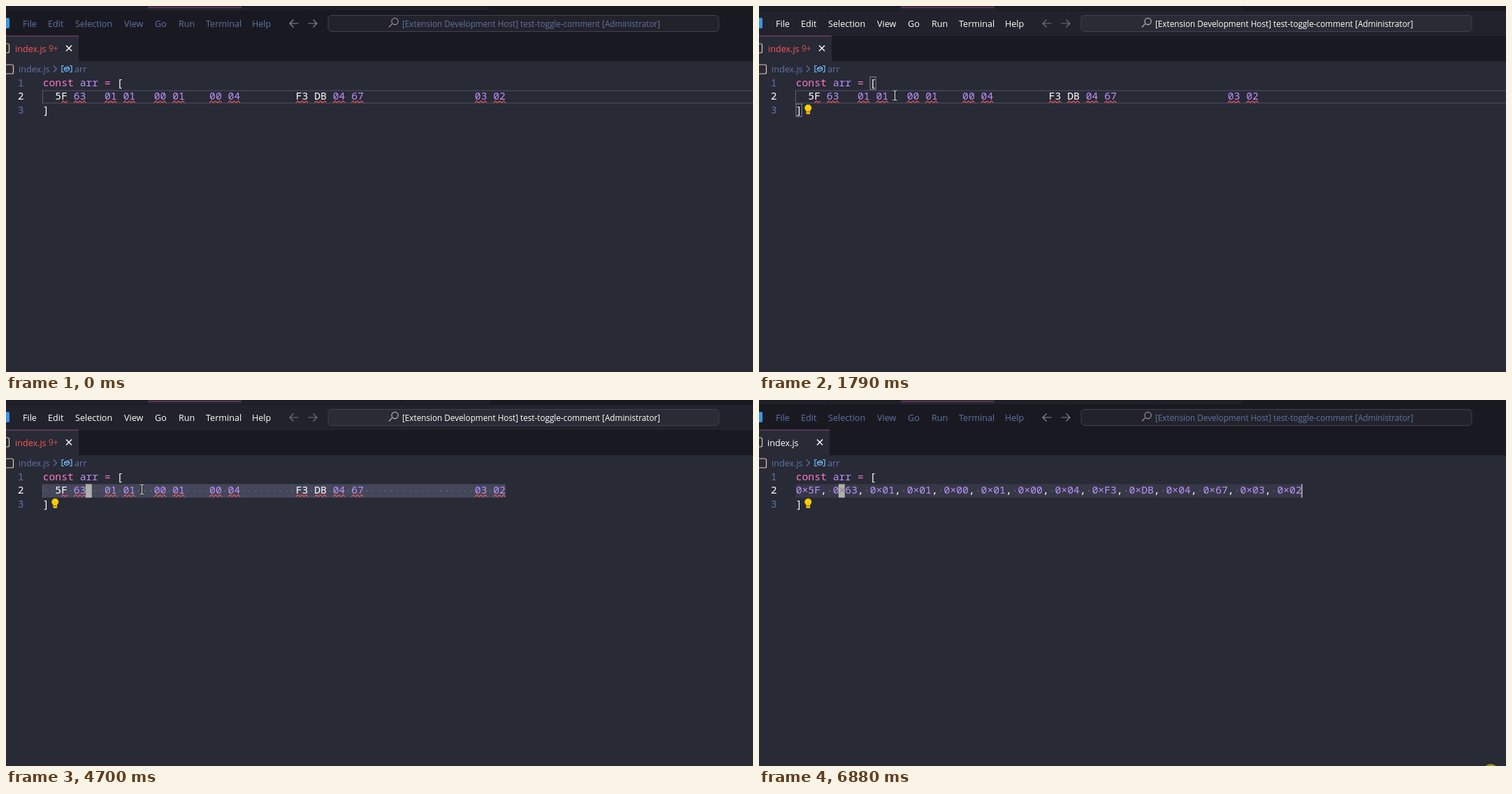
Recreate the animation shown at these times as an HTML page. Size 1069 by 524 pixels, loop 6.91 s.

```html
<!DOCTYPE html>
<html lang="en">
<head>
<meta charset="utf-8">
<title>Hex formatting in an editor</title>
<style>
html, body { margin: 0; width: 100%; height: 100%; overflow: hidden; background: #282a36; }
svg { display: block; width: 1069px; height: 524px; }
text { font: 12.6px "Open Sans", "Noto Sans", sans-serif; white-space: pre; }
.code { font: 500 14.72px "Noto Sans Mono", "DejaVu Sans Mono", monospace; }
.title { font-size: 11.73px; }
.small { font-size: 11.4px; }
.line { fill: none; }
</style>
</head>
<body>
<svg id="stage" viewBox="0 0 1069 524"></svg>
<script>
const LOOP = 6910, CW = 8.83, LEFT = 52.7, TOP = 101, LH = 19.4;
const C = { bg: '#282a36', dark: '#191a21', bar: '#21222c', sel: '#44475a', dim: '#6272a4',
  white: '#ffffff', pink: '#ff79c6', purple: '#bd93f9', red: '#ff5555' };
const stage = document.getElementById('stage');

function add(parent, tag, attrs, text) {
  const el = document.createElementNS('http://www.w3.org/2000/svg', tag);
  for (const k in attrs) el.setAttribute(k, attrs[k]);
  if (text !== undefined) el.textContent = text;
  parent.appendChild(el);
  return el;
}
const set = (el, attrs) => { for (const k in attrs) el.setAttribute(k, attrs[k]); };
const show = (el, on) => el.setAttribute('visibility', on ? 'inherit' : 'hidden');
const group = (p = stage) => add(p, 'g', {});
const box = (p, x, y, width, height, fill, more) => add(p, 'rect', { x, y, width, height, fill, ...more });
const path = (p, d, stroke, width = 1) => add(p, 'path', { d, stroke, 'stroke-width': width, class: 'line' });
const label = (p, x, y, text, fill = C.white, cls = '') => add(p, 'text', { x, y, class: cls, style: 'fill:' + fill }, text);
const colX = c => LEFT + c * CW;
const lineY = n => TOP + (n - 1) * LH;
const code = (p, col, n, text, fill) => label(p, colX(col), lineY(n) + 14, text, fill, 'code');

// window frame
box(stage, 0, 0, 1069, 524, C.bg);
box(stage, 0, 0, 1069, 7, C.dark);
box(stage, 0, 1, 692, 5, '#1f2029');
box(stage, 203, 1, 134, 5, '#252733');
box(stage, 203, 1, 134, 1.5, '#6d3c5f');
for (const x of [99, 437, 564]) box(stage, x, 1, 1, 5, C.dark);
const bar = box(stage, 0, 7, 1069, 36, C.dark);
box(stage, 0, 43, 1069, 36, C.dark);
box(stage, -10, 17, 15, 15, '#3794e8', { rx: 2 });

const barText = [['File', 24], ['Edit', 60], ['Selection', 99], ['View', 169], ['Go', 213],
  ['Run', 247], ['Terminal', 286], ['Help', 352]].map(([s, x]) => label(stage, x, 30, s));
const arrows = [path(stage, 'M418.5 25H406.5M411.5 19.5L406 25L411.5 30.5', '#fff', 1.2),
  path(stage, 'M432.5 25H444.5M439.5 19.5L445 25L439.5 30.5', '#fff', 1.2)];
const search = box(stage, 461, 13.5, 559, 23, C.bar, { rx: 5, stroke: '#40424f' });
const lens = path(stage, 'M552.4 25.6L548 30.5M552 22A4.6 4.6 0 1 1 561.2 22A4.6 4.6 0 1 1 552 22', '#aaa', 1.2);
barText.push(label(stage, 567, 30, '[Extension Development Host] test-toggle-comment [Administrator]', C.white, 'title'));

// file tab and breadcrumb
const tabs = [true, false].map(bad => {
  const g = group(), w = bad ? 104 : 101, x = bad ? 90 : 87;
  box(g, 0, 43, w, 36, C.bg);
  box(g, 0, 42.5, w, 1, '#8a4a78');
  label(g, bad ? 13 : 12, 65.5, 'index.js', bad ? C.red : C.white);
  if (bad) label(g, 61, 65, '9+', '#e05054', 'title');
  path(g, `M${x - 4} 56.5l8 8m0 -8l-8 8`, C.white, 1.4);
  return g;
});
box(stage, -9, 54, 13.5, 13, 'none', { rx: 2, stroke: '#e3c6b0', 'stroke-width': 1.2 });
box(stage, -2, 84, 12.5, 13, 'none', { rx: 2, stroke: '#e3c6b0', 'stroke-width': 1.2 });
label(stage, 18, 95, 'index.js', C.dim);
path(stage, 'M68 85.5L72.5 90L68 94.5', C.dim, 1.1);
path(stage, 'M83 85.5H80V94.5H83M91 85.5H94V94.5H91M83.5 89L88 87L90.5 88.5V91.5L86.5 93.5L83.5 92ZM83.5 89L86.5 90.3L90.5 88.5', '#75beff', 1.2);
label(stage, 98, 95, 'arr', C.dim);

// editor
const activeLine = group();
box(activeLine, LEFT, .2, 1020, 1.4, C.sel);
box(activeLine, LEFT, 17.8, 1020, 1.4, C.sel);
const selection = box(stage, LEFT, lineY(2), 10, LH, C.sel);
const guide = box(stage, 52, lineY(2), 1, LH, '#5b5d68');
const numbers = [1, 2, 3].map(n => label(stage, 16.8, lineY(n) + 14, n, C.dim, 'code'));
code(stage, 0, 1, 'const', C.pink);
code(stage, 6, 1, 'arr', C.purple);
code(stage, 10, 1, '=', C.pink);
code(stage, 12, 1, '[', C.white);
code(stage, 0, 3, ']', C.white);

const bytes = '5F 63 01 01 00 01 00 04 F3 DB 04 67 03 02'.split(' ');
const cols = [2, 5, 10, 13, 18, 21, 27, 30, 41, 44, 47, 50, 70, 73];
const dot = (g, c) => box(g, colX(c) + 3.6, lineY(2) + 9, 1.6, 1.6, '#696c80');
function squiggle(g, c, n) {
  let d = `M${colX(c)} 138.4`;
  for (let i = 1; i <= n * 3; i++) d += `l${CW / 3} ${i % 2 ? -2.4 : 2.4}`;
  path(g, d, C.red, 1.1);
}
const before = group(), dots = group(), after = group();
bytes.forEach((b, i) => {
  code(before, cols[i], 2, b, /^(5F|F3|DB)/.test(b) ? C.white : C.purple);
  squiggle(before, cols[i] + (i ? 0 : 1), i ? 2 : 1);
  code(after, i * 6, 2, '0×' + b, C.purple);
  if (i < 13) {
    code(after, i * 6 + 4, 2, ',', C.white);
    dot(after, i * 6 + 5);
  }
});
for (let c = 0; c < 75; c++)
  if (!cols.some(k => c === k || c === k + 1)) dot(dots, c);

const brackets = group();
for (const [c, n] of [[12, 1], [0, 3]])
  box(brackets, colX(c) + .3, lineY(n) + .5, CW - .6, LH - 1.4, 'none', { stroke: '#85868a' });
const bulb = group();
add(bulb, 'path', { d: 'M65.3 146a5 5 0 1 1 10 0q0 2 -2.2 4.2v3.2q0 1.4 -1.4 1.4h-2.8q-1.4 0 -1.4 -1.4v-3.2q-2.2 -2.2 -2.2 -4.2z', fill: '#ffcc00' });
path(bulb, 'M68.5 151.6h3.6', C.bg, .9);
const block = box(stage, 0, 0, 9, LH, '#aeafad');
const covered = code(stage, 7, 2, '×', '#858688');
const caret = box(stage, 0, lineY(2), 1.3, LH, '#d0d0cc');

// command palette
const palette = group();
for (let i = 4; i > 0; i--)
  box(palette, 405 - i, 13 - i / 2, 616 + 2 * i, 323 + 1.5 * i, '#000', { rx: 6, opacity: .07 });
box(palette, 405, 13, 616, 323, C.bar, { rx: 5 });
box(palette, 412.5, 22.5, 597, 26, C.bg, { rx: 1.5, stroke: C.dim });
label(palette, 420, 41, '>');
const inputCaret = box(palette, 428, 27, 1.2, 18, C.white);
add(add(palette, 'clipPath', { id: 'list' }), 'rect', { x: 405, y: 50, width: 616, height: 285 });
const list = add(palette, 'g', { 'clip-path': 'url(#list)' });
const focusRow = group(list), slider = box(list, 1011, 53, 10, 20, '#565a72', { opacity: .55 });
box(focusRow, 411, 53, 605, 22.5, C.sel, { rx: 3 });
box(focusRow, 1010, 53, 6, 22.5, '#4a4d61', { rx: 2 });
add(focusRow, 'circle', { cx: 991.7, cy: 64.5, r: 5.4, fill: 'none', stroke: C.white, 'stroke-width': 1.3 });
add(focusRow, 'circle', { cx: 991.7, cy: 64.5, r: 6.4, fill: 'none', stroke: C.white, 'stroke-width': 1.8, 'stroke-dasharray': '2.5 2.53' });
add(focusRow, 'circle', { cx: 991.7, cy: 64.5, r: 2, fill: 'none', stroke: C.white, 'stroke-width': 1.2 });

// keys are laid out from the right; "/" parts two chords
function keys(g, y, spec) {
  let x = 997;
  spec.split(' ').reverse().forEach(k => {
    if (k === '/') { x -= 11; return; }
    if (k === '+') { label(g, x - 10.6, y + 4.5, '+', C.white, 'title'); x -= 15; return; }
    const t = label(g, 0, y + 4, k, '#dededc', 'small');
    const tw = t.getComputedTextLength(), w = tw + 10.2;
    x -= w;
    g.insertBefore(box(g, x, y - 9, w, 18, '#30313b', { rx: 3 }), t);
    t.setAttribute('x', x + (w - tw) / 2);
  });
}
const sides = [['vscode-awesome-hex: Prettier Hex'], ['View: Zoom Out', 'Ctrl + Shift + -'],
  ['View: Zoom In', 'Ctrl + Shift + ='], ['Preferences: Open User Settings (JSON)'],
  ['ESLint: Restart ESLint Server'], ['Project Manager: List Projects to Open', 'Shift + Alt + P'],
  ['Live Server: Open with Live Server', 'Alt + L / Alt + O'], ['Quick Fix...', 'Ctrl + .'],
  ['Snippets: Configure Snippets'], ['Developer: Restart Extension Host'],
  ['TypeScript: Select TypeScript Version...'], ['File: Open Recent...', 'Ctrl + R'],
  ['Developer: Reload Window', 'Ctrl + R']].map(([name, spec], i) => {
  const y = 64.5 + i * 22.56, g = group(list);
  label(list, 422, y + 4.8, name);
  if (spec) keys(g, y, spec);
  if (!i) label(g, 997, y + 4.8, 'recently used').setAttribute('text-anchor', 'end');
  return g;
});

// pointer
const mouse = group();
const beam = 'M-3 -7Q0 -7 0 -5.5Q0 -7 3 -7M0 -6V6M-3 7Q0 7 0 5.5Q0 7 3 7';
path(mouse, beam, '#15161c', 2.4);
path(mouse, beam, '#e4e4e4', 1.1);
const click = add(stage, 'circle', { cx: 1047, cy: 532, r: 11, fill: '#9a901f' });

const route = [[40, 1060, 476], [340, 520, 330], [600, 165, 215], [700, 134.5, 191], [760, 128, 165],
  [1100, 118, 131], [1290, 118, 128], [1400, 194.5, 128], [5800, 194.5, 128], [5950, 215, 98],
  [6150, 480, 220], [6400, 940, 475], [6480, 1002, 514], [6540, 1014, 523]];
const ramp = (t, a, b) => Math.min(1, Math.max(0, (t - a) / (b - a)));
const mix = (a, b, k) => a + (b - a) * k;
const within = (t, a, b) => t >= a && t < b;
function along(t) {
  let i = 1;
  while (i < route.length - 1 && t > route[i][0]) i++;
  const [a, x, y] = route[i - 1], [b, u, v] = route[i], k = ramp(t, a, b);
  return [mix(x, u, k), mix(y, v, k)];
}

function draw(t) {
  const focused = within(t, 676, 6800), open = within(t, 2940, 4700);
  const selected = t >= 2200, done = t >= 4770, clean = t >= 5170;

  bar.setAttribute('fill', focused ? C.bar : C.dark);
  barText.forEach(el => { el.style.fill = focused ? C.white : C.dim; });
  arrows.forEach((el, i) => el.setAttribute('stroke', focused ? '#73747c' : i ? '#85868d' : '#8d8e95'));
  search.setAttribute('fill', focused ? '#2a2b35' : '#22232a');
  lens.setAttribute('stroke', focused ? '#b8b8b8' : '#a3909c');
  show(tabs[0], !clean);
  show(tabs[1], clean);

  const row = within(t, 676, 1290) ? 3 : 2;
  activeLine.setAttribute('transform', `translate(0 ${lineY(row)})`);
  show(activeLine, !selected);
  numbers.forEach((el, i) => { el.style.fill = i + 1 === row ? C.white : C.dim; });
  show(selection, selected);
  set(selection, { width: CW * (done ? 82 : 75), fill: focused && !open ? C.sel : '#363847' });
  show(guide, !done);
  show(before, !done);
  show(dots, selected && !done);
  show(after, done);
  show(brackets, within(t, 730, 2200));
  show(bulb, t >= 1500);

  const down = ramp(t, 676, 756), up = ramp(t, 1290, 1370);
  set(block, {
    x: t < 1290 ? mix(colX(16), LEFT, down) : mix(LEFT, colX(7) - .7, up),
    y: t < 1290 ? mix(lineY(2), lineY(3), down) : mix(lineY(3), lineY(2), up)
  });
  show(block, within(t, 676, 1790) || selected);
  show(covered, done);
  const end = done ? mix(75, 82, ramp(t, 4790, 4870)) : mix(7, 75, ramp(t, 2200, 2280));
  caret.setAttribute('x', colX(end) - .5);
  show(caret, within(t, 2200, 2740) || within(t, 4790, 5370) || within(t, 5870, 6370) || t >= 6800);

  show(palette, open);
  show(inputCaret, open && !within(t, 3550, 4190));
  show(slider, open && within(t, 3090, 4030));
  const pick = within(t, 4300, 4500) ? 1 : 0;
  focusRow.setAttribute('transform', `translate(0 ${pick * 22.56})`);
  sides.forEach((g, i) => g.setAttribute('transform', `translate(${i === pick ? -20 : 0} 0)`));

  const [x, y] = along(t);
  mouse.setAttribute('transform', `translate(${x} ${y})`);
  show(mouse, within(t, 40, 6540));
  show(click, t >= 6840);
}

const start = performance.now();
function tick(now) {
  draw(Math.max(0, now - start) % LOOP);
  requestAnimationFrame(tick);
}
draw(0);
requestAnimationFrame(tick);
</script>
</body>
</html>
```
